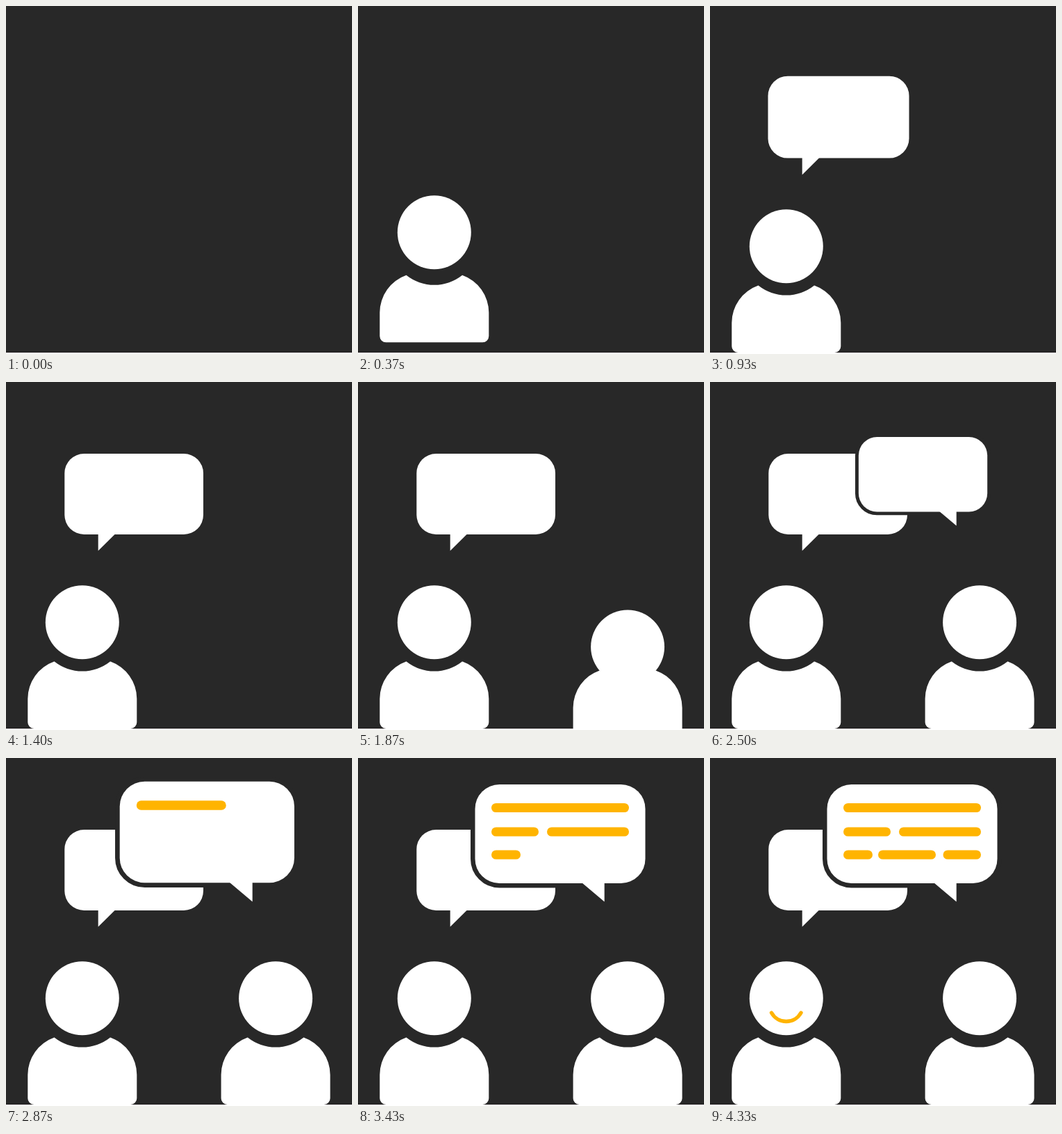
Animation of 498 by 500 pixels, one loop 6.03 s. Source, as an HTML page:

```html
<!DOCTYPE html>
<html lang="en">
<head>
<meta charset="utf-8">
<title>Conversation</title>
<style>
  html, body { margin: 0; height: 100%; overflow: hidden; background: #282828; }
  svg { display: block; width: 100%; height: 100%; }
  .ink { fill: none; stroke: #ffb400; stroke-linecap: round; }
</style>
</head>
<body>
<svg viewBox="0 0 498 500" fill="#fff">
  <defs>
    <circle id="head" cx="109.8" cy="345.2" r="53"/>
    <path id="body" d="M69.5 401.5A65 65 0 0 0 150.1 401.5A57 57 0 0 1 188.3 455V489a9 9 0 0 1-9 9H40.3a9 9 0 0 1-9-9V455A57 57 0 0 1 69.5 401.5Z"/>
  </defs>
  <rect y="497" width="498" height="1" fill="#231f20"/>
  <rect y="498" width="498" height="2"/>

  <use href="#body" class="body"/>
  <use href="#head" class="head"/>
  <use href="#body" class="body"/>
  <use href="#head" class="head"/>

  <g class="bubble">
    <rect x="84.3" y="103" width="199.7" height="116" rx="28"/>
    <path d="M132.7 218V242.5L157.5 218Z"/>
  </g>
  <g class="bubble">
    <rect x="168.5" y="38" width="245" height="142" rx="35" stroke="#282828" stroke-width="13" paint-order="stroke"/>
    <path d="M322 179L354.7 206.5V179Z"/>
    <g id="bars" class="ink" stroke-width="13.2"></g>
  </g>
  <path id="smile" class="ink" stroke-width="5.4" pathLength="1" d="M88.5 366A24.3 24.3 0 0 0 131 366"/>
</svg>
<script>
const LOOP = 6030;
const all = s => [...document.querySelectorAll(s)];
const heads = all('.head'), bodies = all('.body'), bubbles = all('.bubble');
const bars = document.getElementById('bars');
const smile = document.getElementById('smile');

// Eased progress of t between two times
const ease = (t, from, to) => {
  const p = Math.min(1, Math.max(0, (t - from) / (to - from)));
  return (1 - Math.cos(Math.PI * p)) / 2;
};

// Go from start to peak, then settle at rest
const overshoot = (t, times, [start, peak, rest]) =>
  start + (peak - start) * ease(t, times[0], times[1])
        + (rest - peak) * ease(t, times[1], times[2]);

const people = [{ x: 0, delay: 0 }, { x: 278.3, delay: 1583 }];
const tips = [{ x: 132.7, y: 242.5, delay: 0 }, { x: 354.7, y: 206.5, delay: 1667 }];
const rows = [
  { y: 71.5, from: 2700, to: 3000, parts: [[192, 390]] },
  { y: 106, from: 3000, to: 3335, parts: [[192, 260], [272, 390]] },
  { y: 139, from: 3335, to: 3670, parts: [[192, 234], [242, 325], [335.5, 390]] }
];
const cap = 6.6;

for (const row of rows) {
  row.lines = row.parts.map(([x1]) => {
    const line = document.createElementNS('http://www.w3.org/2000/svg', 'line');
    line.setAttribute('x1', x1 + cap);
    line.setAttribute('y1', row.y);
    line.setAttribute('y2', row.y);
    return bars.appendChild(line);
  });
}

const move = (el, x, y) => el.setAttribute('transform', `translate(${x} ${y})`);
const show = (el, on) => el.setAttribute('visibility', on ? 'visible' : 'hidden');

function draw(t) {
  people.forEach(({ x, delay }, i) => {
    const times = [67, 400, 800];
    move(bodies[i], x, overshoot(t - delay, times, [100, -16.8, 0]));
    move(heads[i], x, overshoot(t - delay, times, [210, -24.3, 0]));
  });

  tips.forEach(({ x, y, delay }, i) => {
    const s = overshoot(t - delay, [567, 983, 1400], [0, 1.057, 1]);
    bubbles[i].setAttribute('transform',
      `translate(${x} ${y}) scale(${s}) translate(${-x} ${-y})`);
    bubbles[i].style.display = s > 0 ? '' : 'none';
  });

  for (const { from, to, parts, lines } of rows) {
    const pen = 192 + cap + (198 - 2 * cap) * ease(t, from, to);
    lines.forEach((line, i) => {
      const [x1, x2] = parts[i];
      line.setAttribute('x2', Math.min(pen, x2 - cap));
      show(line, t > from && pen >= x1 + cap);
    });
  }

  const p = ease(t, 3835, 4330);
  smile.setAttribute('stroke-dasharray', `${p} 2`);
  show(smile, p > 0);
}

function tick() {
  draw(performance.now() % LOOP);
  requestAnimationFrame(tick);
}
tick();
</script>
</body>
</html>
```
